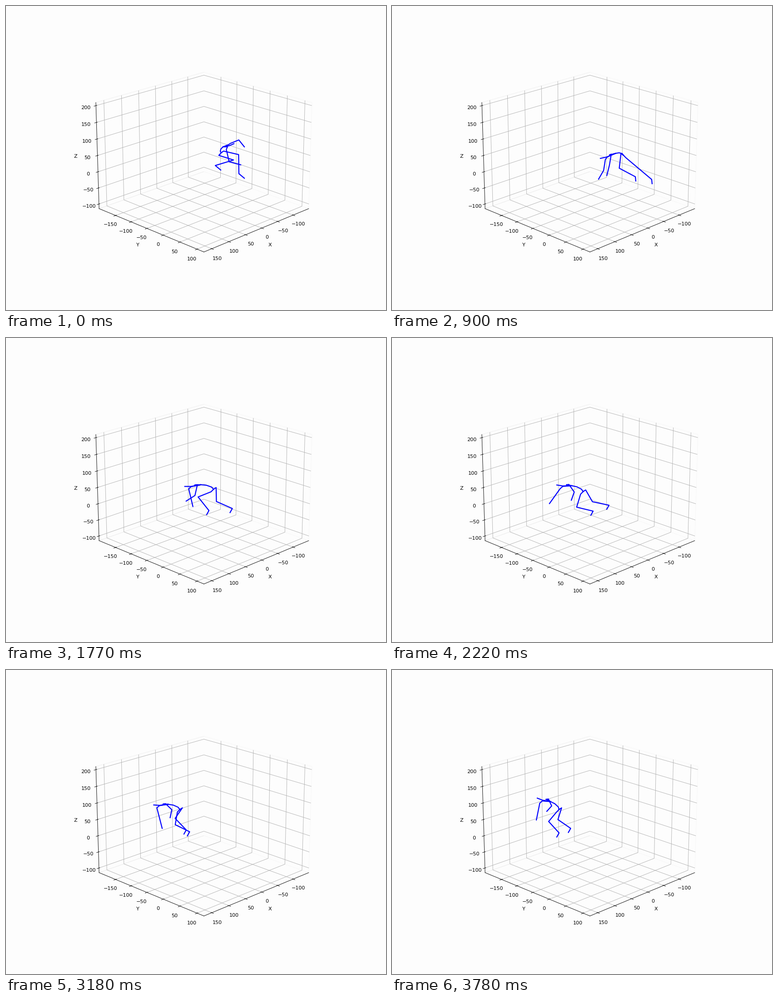
These frames come from a looping animation (837x669 px, 3.81 s). A matplotlib script:

```python
import numpy as np
import matplotlib.pyplot as plt
from matplotlib.animation import FuncAnimation
from matplotlib.lines import Line2D
from matplotlib.ticker import FixedLocator

W, H, DPI = 837, 669, 80
STEP, LOOP = 30, 3810


def ease(u):
    u = np.clip(u, 0, 1)
    return u * u * (3 - 2 * u)


def mix(a, b, u):
    return np.asarray(a, float) * (1 - u) + np.asarray(b, float) * u


def path(keys):
    """Monotone cubic through {ms: (x, y)}; equal neighbours stay at rest."""
    t = np.array(list(keys), float)
    p = np.array(list(keys.values()), float)
    h = np.diff(t)
    d = np.diff(p, axis=0) / h[:, None]
    a, b = d[:-1], d[1:]
    same = a * b > 0
    mean = 2 * a * b / np.where(same, a + b, 1)
    slope = np.vstack([d[:1], np.where(same, mean, 0), d[-1:]])

    def at(ms):
        i = int(np.clip(np.searchsorted(t, ms, "right") - 1, 0, len(h) - 1))
        u = (ms - t[i]) / h[i]
        v = 1 - u
        return (v * v * (1 + 2 * u) * p[i] + u * u * (1 + 2 * v) * p[i + 1]
                + h[i] * u * v * (v * slope[i] - u * slope[i + 1]))

    return at


# Only trunk, hands and feet are keyed (stage pixels); the rest follows by rule.
head_at = path({0: (502, 303), 510: (482, 339), 1290: (432, 330),
                2220: (363, 323.5), 2790: (343, 316.5),
                3180: (325.5, 297), 3780: (320, 282)})
thorax_at = path({0: (478, 310), 510: (507, 328), 1290: (466, 320.5),
                  2220: (396, 325), 2790: (372, 313.5),
                  3180: (357, 295.5), 3780: (349, 289.5)})
root_at = path({0: (474, 323), 510: (517, 330), 1290: (494.5, 327),
                2220: (421, 338), 2790: (400, 324),
                3180: (383, 307), 3780: (368, 307)})
l_hand_at = path({0: (525, 310), 510: (487.5, 388), 1290: (434, 373),
                  1590: (432, 372), 2100: (354.5, 367), 2520: (336.5, 358),
                  2790: (351, 365.5), 3180: (344, 348.5),
                  3510: (302.5, 335), 3780: (318, 330)})
r_hand_at = path({0: (517, 349.5), 510: (484.5, 376), 1290: (459.5, 367),
                  1590: (398, 360), 2220: (395, 357), 2790: (378, 351),
                  3180: (361.5, 325), 3780: (341, 311)})
l_foot_at = path({0: (513, 369), 510: (518.5, 354), 840: (572, 382),
                  1080: (571, 378), 1290: (538, 366), 1800: (446, 380),
                  2220: (443, 381), 2790: (444, 374),
                  3180: (404.5, 356), 3780: (368, 358.5)})
r_foot_at = path({0: (461, 351), 330: (556, 382), 510: (542, 376.5),
                  1290: (530, 375.5), 1650: (503, 376), 2130: (487, 369),
                  2220: (478, 368), 2550: (430, 362), 2790: (428, 359.5),
                  3180: (397, 352), 3780: (393.5, 348.5)})


def normal(a, b):
    """Unit vector across the line from a to b."""
    dx, dy = b - a
    return np.array([dy, -dx]) / np.hypot(dx, dy)


def across(yaw, rx, ry):
    """Seen from above at a slant, the body's width traces an ellipse."""
    a = np.radians(yaw)
    return np.array([rx * np.cos(a), ry * np.sin(a)])


def spine(head, thorax, root):
    side = np.tanh((root[0] - head[0]) / 8)
    bulge = 3 * side * normal(thorax, root)
    neck = mix(thorax, head, 0.6) + (0, 1.5)
    back = [mix(thorax, root, f) + bulge for f in (0.4, 0.8)]
    return np.array([head, neck, thorax, *back, root])


def arm(thorax, centre, half, hand, bend):
    collar = centre + 0.4 * half + (0, -2)
    shoulder = centre + half
    elbow = mix(shoulder, hand, 0.52) + bend * normal(shoulder, hand)
    return np.array([thorax, collar, shoulder, elbow, hand])


def leg(root, hip, ankle, side, thigh, shin, foot):
    """Knee from the bone lengths; side runs from 1 to -1 as the body turns."""
    reach = np.hypot(*(ankle - hip))
    along = (reach ** 2 + thigh ** 2 - shin ** 2) / (2 * reach)
    out = np.sqrt(max(thigh ** 2 - along ** 2, 0))
    knee = mix(hip, ankle, along / reach) + side * out * normal(hip, ankle)
    return np.array([root, hip, knee, ankle, ankle + foot])


def pose(ms):
    head, thorax, root = head_at(ms), thorax_at(ms), root_at(ms)
    turn = ease(ms / 1500)

    chest = mix(thorax, head, 0.48) + (0, 2.5)
    half = across(mix(-70, 140, ease(ms / 1100)), 12.5, 7)
    pelvis = root + (0, 1)
    hip = across(mix(-60, 122, turn), 10.5, 5.5)

    far = ms / LOOP
    thigh, shin = mix(34, 27, far), mix(42, 34, far)
    foot = mix((12, 10), (-5, 9), turn)
    l_side = 1 - 2 * ease((ms - 300) / 700)
    r_side = 1 - 2 * ease(ms / 400)

    return [
        spine(head, thorax, root),
        arm(thorax, chest, half, l_hand_at(ms), mix(12, 0, turn)),
        arm(thorax, chest, -half, r_hand_at(ms), mix(-14, 9, turn)),
        leg(root, pelvis + hip, l_foot_at(ms), l_side, thigh, shin, foot),
        leg(root, pelvis - hip, r_foot_at(ms), r_side, thigh, shin, foot),
    ]


fig = plt.figure(figsize=(W / DPI + 1e-6, H / DPI + 1e-6), dpi=DPI,
                 facecolor="#fdfdfd")
ax = fig.add_subplot(projection="3d")
ax.view_init(elev=20, azim=45)
ax.patch.set_visible(False)
ax.set(xlabel="X", ylabel="Y", zlabel="Z",
       xlim=(-151.6, 172.4), ylim=(-204.5, 119.5), zlim=(-114.6, 209.4))
for axis, first, last in ((ax.xaxis, -100, 150), (ax.yaxis, -150, 100),
                          (ax.zaxis, -100, 200)):
    axis.set_major_locator(FixedLocator(np.arange(first, last + 1, 50)))
    axis.pane.fill = False

bones = [fig.add_artist(Line2D([], [], color="blue", lw=2,
                               solid_capstyle="projecting",
                               transform=fig.transFigure))
         for _ in range(5)]


def draw(frame):
    for line, chain in zip(bones, pose(frame * STEP)):
        line.set_data(chain[:, 0] / W, 1 - chain[:, 1] / H)
    return bones


anim = FuncAnimation(fig, draw, frames=LOOP // STEP, interval=STEP,
                     repeat=True, repeat_delay=0)
plt.show()
```
